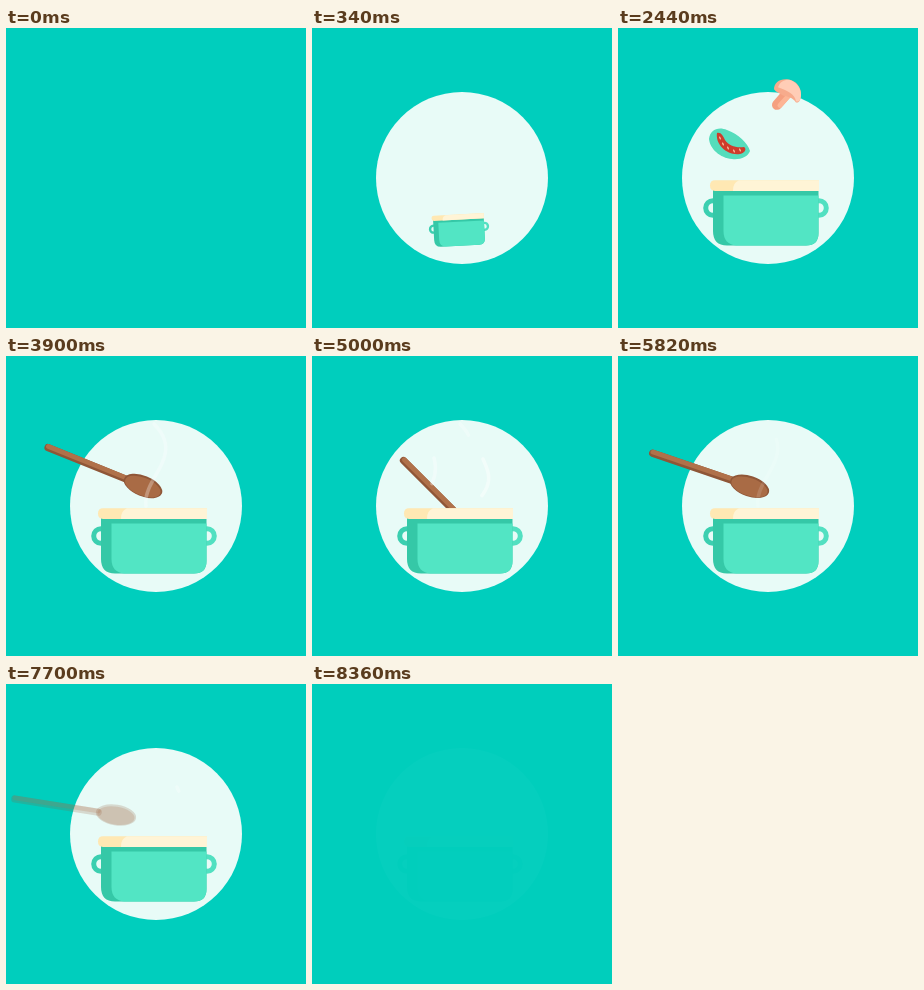
Write an HTML page with a canvas that moves like this. It is 300 px wide and 300 px high and loops after 8420 ms.

```html
<!DOCTYPE html>
<html lang="en">
<head>
<meta charset="utf-8">
<title>Cooking pot</title>
<style>
html, body { margin: 0; width: 100%; height: 100%; overflow: hidden; background: #00cebd; }
canvas { display: block; width: 300px; height: 300px; }
</style>
</head>
<body>
<canvas id="stage"></canvas>
<script>
const LOOP = 8420;
const canvas = document.getElementById('stage');
const ctx = canvas.getContext('2d');
const ratio = window.devicePixelRatio || 1;
canvas.width = canvas.height = 300 * ratio;

const clamp = x => Math.max(0, Math.min(1, x));
const span = (t, a, b) => clamp((t - a) / (b - a));
const easeOut = x => 1 - Math.pow(1 - x, 3);
const smooth = x => x * x * (3 - 2 * x);

function fillPath(d, color) {
  ctx.fillStyle = color;
  ctx.fill(new Path2D(d));
}

function ellipse(x, y, rx, ry, color) {
  ctx.fillStyle = color;
  ctx.beginPath();
  ctx.ellipse(x, y, rx, ry, 0, 0, Math.PI * 2);
  ctx.fill();
}

function line(x1, y1, x2, y2, width, color) {
  ctx.strokeStyle = color;
  ctx.lineWidth = width;
  ctx.lineCap = 'round';
  ctx.beginPath();
  ctx.moveTo(x1, y1);
  ctx.lineTo(x2, y2);
  ctx.stroke();
}

// Draws in a local frame placed at x, y.
function place(x, y, degrees, scale, draw) {
  ctx.save();
  ctx.translate(x, y);
  ctx.rotate(degrees * Math.PI / 180);
  ctx.scale(scale, scale);
  draw();
  ctx.restore();
}

function handle(x, color) {
  ctx.strokeStyle = color;
  ctx.lineWidth = 5;
  ctx.beginPath();
  ctx.arc(x, 180, 7.3, 0, Math.PI * 2);
  ctx.stroke();
}

function drawPot() {
  handle(95, '#3bcfb0');
  handle(201, '#52e0c1');
  fillPath('M95 160H200.5V205Q200.5 217.5 188 217.5H109Q95 217.5 95 203Z', '#35c8a7');
  fillPath('M105.5 167.5H200.5V205Q200.5 217.5 188 217.5H118Q105.5 216 105.5 203Z', '#52e5c4');
  fillPath('M97 152.3H201V163H97Q92 163 92 157.6Q92 152.3 97 152.3Z', '#ffe8b3');
  fillPath('M121 152.3H201V163H115Q114.5 155 121 152.3Z', '#fff4d6');
}

function drawTomato() {
  fillPath('M-21-5C-20-14-12-18-3-14C8-10 18-1 20 7C18 13 10 16 2 15C-10 14-20 5-21-5Z', '#55ddbc');
  fillPath('M-13-11C-9-12-7-8-5-4C-1 2 6 4 14 3C17 5 15 9 10 10C-2 12-15 1-13-11Z', '#cf3b2b');
  for (const [x, y] of [[-10, -6], [-7, 0], [-2, 4], [4, 7], [10, 6]]) {
    line(x - .3, y - .9, x + .3, y + .9, 1.2, '#ffd3b0');
  }
}

function drawMushroom() {
  line(1, -1, -9, 10.5, 10, '#f5a080');
  line(3, 1, -6, 11, 5, '#fdb595');
  fillPath('M-12-5C-12-12-6-16 2-15C10-14 15-8 15 0C15 5 13 9 10 8C7 3 1 2-3 1C-6-1-10-2-12-5Z', '#f7ab8c');
  fillPath('M-8-7C-6-13-1-15 4-14.5C11-12 15-6 15 0C15 5 13 8 10 7C9 0 1-4-8-7Z', '#ffcdb6');
}

const items = [
  { start: 1120, x: 152, y: 84, drop: 92, power: 5, turn: 40, draw: drawMushroom },
  { start: 1560, x: 112, y: 83.5, drop: 88, power: 6, turn: 24, draw: drawTomato },
  { start: 2000, x: 168, y: 62.5, drop: 120, power: 4, turn: 30, draw: drawMushroom }
];

function drawItems(t) {
  for (const item of items) {
    const u = (t - item.start) / 1040;
    if (u <= 0 || u >= 1) continue;
    const fall = Math.pow(u, item.power);
    const rest = item.draw === drawTomato ? .37 : .03;
    place(item.x, item.y + item.drop * fall, item.turn * (fall - rest),
      easeOut(clamp(u / .3)), item.draw);
  }
}

// time, bowl x, bowl y, angle
const stir = [
  [3520, 110, 131, 9],
  [3900, 137, 130, 22],
  [4380, 147, 157, 35],
  [4700, 166, 181, 52],
  [5000, 164, 177, 45],
  [5360, 148, 158, 35],
  [5720, 137, 130, 22],
  [6080, 116, 131.5, 12],
  [6300, 110, 131, 9],
  [7780, 110, 131, 9]
];

function stirPose(t) {
  let i = 0;
  while (i < stir.length - 2 && t > stir[i + 1][0]) i++;
  const a = stir[i], b = stir[i + 1];
  const dt = b[0] - a[0], u = clamp((t - a[0]) / dt);
  const slope = (k, c) => {
    const p = stir[k - 1], q = stir[k], r = stir[k + 1];
    if (!p || !r) return 0;
    const s1 = (q[c] - p[c]) / (q[0] - p[0]), s2 = (r[c] - q[c]) / (r[0] - q[0]);
    return s1 * s2 > 0 ? 2 * s1 * s2 / (s1 + s2) : 0;
  };
  return [1, 2, 3].map(c =>
    a[c] + (b[c] - a[c]) * smooth(u) +
    dt * u * (1 - u) * ((1 - u) * slope(i, c) - u * slope(i + 1, c)));
}

function drawSpoon(t) {
  if (t < 3520 || t >= 7780) return;
  const [x, y, angle] = stirPose(t);
  ctx.globalAlpha = span(t, 3500, 3660) * (1 - span(t, 7400, 7780));
  place(x, y, angle, 1, () => {
    line(-102.5, 0, -18, 0, 7.2, '#8f5637');
    line(-102.5, -1.2, -18, -1.2, 4.8, '#b0714a');
    ellipse(0, 0, 20.3, 10.3, '#8f5637');
    ellipse(0, .6, 18.8, 8.9, '#a96b45');
  });
  ctx.globalAlpha = 1;
}

// Each plume is one curve; its visible part runs upwards.
const plumes = [
  { curve: [140, 150, 136, 122, 180, 100, 148, 68], head: [0, .18], tail: [.37, .74] },
  { curve: [116, 152, 112, 132, 128, 125, 122, 102], head: [.18, .37], tail: [.5, .88] },
  { curve: [168, 142, 182, 125, 176, 115, 171, 103], head: [.4, .62], tail: [.68, 1] }
];

function curveAt(p, u, k) {
  const v = 1 - u;
  return v * v * v * p[k] + 3 * v * v * u * p[k + 2] + 3 * v * u * u * p[k + 4] + u * u * u * p[k + 6];
}

function drawSteam(t) {
  if (t < 3520 || t >= 7780) return;
  const u = ((t - 3520) % 2130) / 2130;
  ctx.lineWidth = 3.6;
  ctx.lineCap = 'round';
  for (const { curve, head, tail } of plumes) {
    const to = easeOut(span(u, ...head)), from = span(u, ...tail);
    if (to <= from) continue;
    const alpha = .45 * clamp((u - head[0]) / .28) * (1 - .4 * from);
    ctx.strokeStyle = `rgba(255,255,255,${alpha})`;
    ctx.beginPath();
    for (let i = 0; i <= 24; i++) {
      const s = from + (to - from) * i / 24;
      ctx.lineTo(curveAt(curve, s, 0), curveAt(curve, s, 1));
    }
    ctx.stroke();
  }
}

const layer = document.createElement('canvas');
layer.width = layer.height = canvas.width;

function render(t) {
  ctx.setTransform(ratio, 0, 0, ratio, 0, 0);
  ctx.globalAlpha = 1;
  ctx.fillStyle = '#00cebd';
  ctx.fillRect(0, 0, 300, 300);
  const radius = 86 * easeOut(span(t, 30, 300));
  if (radius > 0 && t < 8370) {
    ellipse(150, 150, radius, radius, '#e8fbf7');
    drawItems(t);
    drawSpoon(t);
    drawSteam(t);
    const grow = smooth(span(t, 190, 500));
    if (grow > 0) {
      place(148, 218, -6 * (1 - grow), grow, () => {
        ctx.translate(-148, -218);
        drawPot();
      });
    }
  }
  const fade = span(t, 7990, 8370);
  if (fade > 0) {
    ctx.globalAlpha = fade;
    ctx.fillStyle = '#00cebd';
    ctx.fillRect(0, 0, 300, 300);
  }
}

const begin = performance.now();
function tick() {
  render((performance.now() - begin) % LOOP);
  requestAnimationFrame(tick);
}
tick();
</script>
</body>
</html>
```
